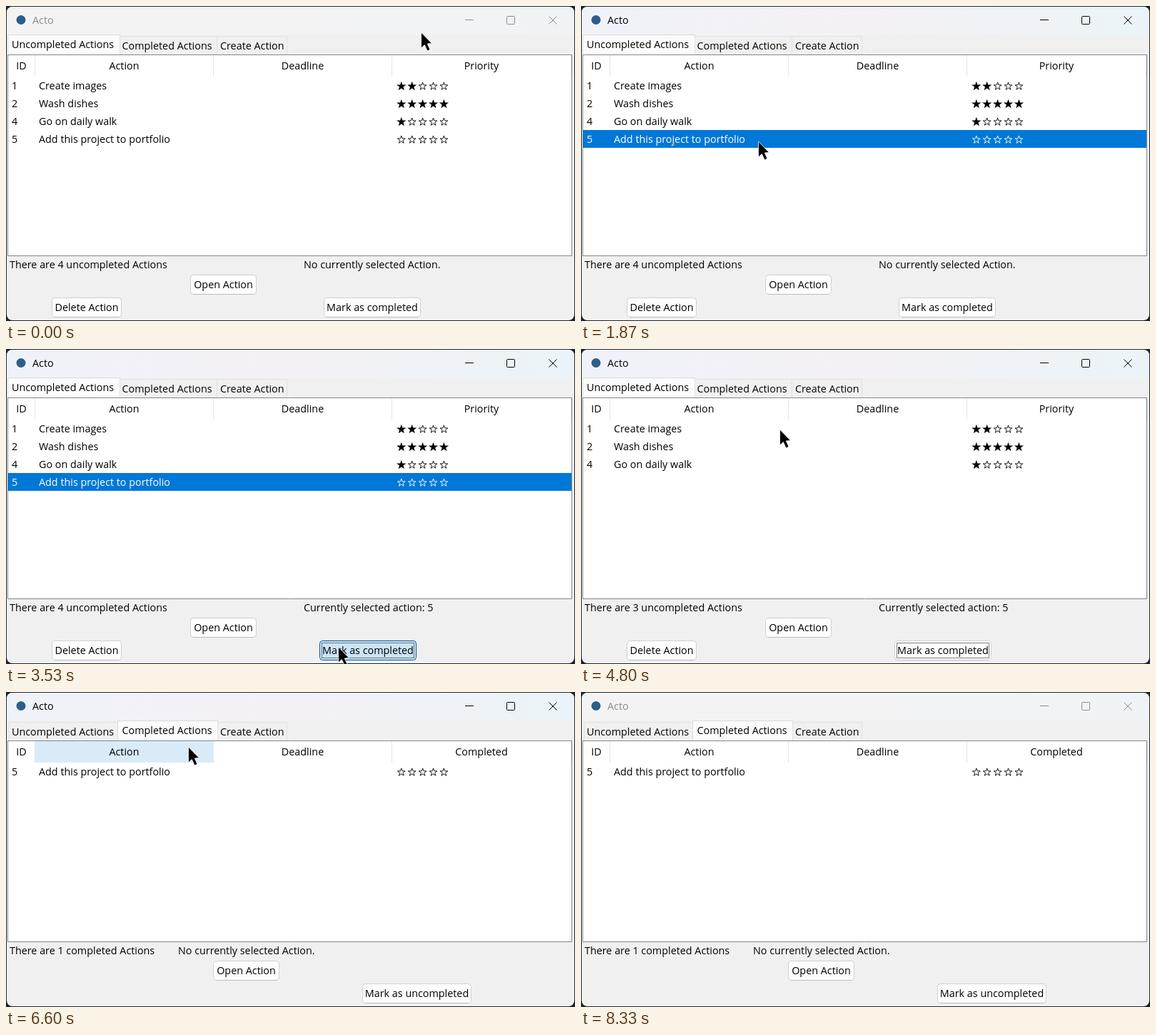
Animation, 797 px wide and 442 px high, one loop 8470 ms. Source, as an HTML page with a canvas:

```html
<!DOCTYPE html>
<html lang="en">
<head>
<meta charset="utf-8">
<title>Acto</title>
<style>
html, body { margin: 0; width: 100%; height: 100%; overflow: hidden; background: #1c2331; }
canvas { display: block; }
</style>
</head>
<body>
<canvas id="stage" width="797" height="442"></canvas>
<script>
const ctx = document.getElementById('stage').getContext('2d');
const LOOP = 8470, TICK = 200 / 3;
const BLACK = '#000', WHITE = '#fff', FACE = '#f0f0f0', LINE = '#dadada';

// Moments when the interface changes, in ms
const SELECT = 1866, STATUS = 1930, PRESS = 3465, REMOVE = 3665, SWITCH = 5530, BLUR = 8265;

// Pointer path: time, x, y
const PATH = [
  [0, 581, 36], [267, 449, 253], [533, 449, 253], [867, 309, 226],
  [1067, 309, 226], [1733, 248, 189], [2200, 248, 189], [3067, 465, 404],
  [3400, 465, 417], [3867, 465, 417], [4733, 281, 133], [4800, 278, 112],
  [5400, 248, 54], [5800, 248, 54], [6600, 255, 76], [6667, 256, 81],
  [7533, 99, 400], [7800, 82, 448], [LOOP, 82, 448]
];
const COLUMNS = [[3, 40], [40, 291], [290, 541], [540, 792]];
const ACTIONS = [
  ['1', 'Create images', 2], ['2', 'Wash dishes', 5],
  ['4', 'Go on daily walk', 1], ['5', 'Add this project to portfolio', 0]
];

const slope = (i, axis) =>
  (PATH[i + 1][axis] - PATH[i][axis]) / (PATH[i + 1][0] - PATH[i][0]);

// Zero at rests and turning points, so the path never overshoots
function tangent(i, axis) {
  if (i === 0) return slope(0, axis);
  if (i === PATH.length - 1) return 0;
  const a = slope(i - 1, axis), b = slope(i, axis);
  return a * b > 0 ? 2 * a * b / (a + b) : 0;
}

function pointerAt(t) {
  let i = 0;
  while (i < PATH.length - 2 && t >= PATH[i + 1][0]) i++;
  const span = PATH[i + 1][0] - PATH[i][0], u = (t - PATH[i][0]) / span;
  const u2 = u * u, u3 = u2 * u;
  const at = axis => Math.round(
    (2 * u3 - 3 * u2 + 1) * PATH[i][axis] + (3 * u2 - 2 * u3) * PATH[i + 1][axis] +
    span * ((u3 - 2 * u2 + u) * tangent(i, axis) + (u3 - u2) * tangent(i + 1, axis)));
  return { x: at(1), y: at(2) };
}

function rect(x, y, w, h, color) {
  ctx.fillStyle = color;
  ctx.fillRect(x, y, w, h);
}

function box(x, y, w, h, radius, fill, stroke) {
  ctx.beginPath();
  ctx.roundRect(x + 0.5, y + 0.5, w - 1, h - 1, radius);
  if (fill) { ctx.fillStyle = fill; ctx.fill(); }
  if (stroke) { ctx.strokeStyle = stroke; ctx.lineWidth = 1; ctx.stroke(); }
}

function text(str, x, y, color = BLACK, align = 'left') {
  ctx.fillStyle = color;
  ctx.textAlign = align;
  ctx.fillText(str, x, y);
}

function polygon(points) {
  ctx.beginPath();
  points.forEach(([x, y]) => ctx.lineTo(x, y));
  ctx.closePath();
}

function star(cx, cy, filled, color) {
  const radius = filled ? 7 : 5.7;
  polygon(Array.from({ length: 10 }, (_, i) => {
    const r = i % 2 ? radius * 0.4 : radius, a = (i / 5 - 0.5) * Math.PI;
    return [cx + r * Math.cos(a), cy + r * Math.sin(a)];
  }));
  ctx.fillStyle = ctx.strokeStyle = color;
  ctx.lineWidth = 0.9;
  if (filled) ctx.fill(); else ctx.stroke();
}

function titleBar(active) {
  const shade = ctx.createLinearGradient(0, 0, 797, 0);
  const stops = active ? ['#f0f2f9', '#f4f1f6', '#eaf4f8'] : ['#f3f3f3', '#f3f3f4', '#f0f3f5'];
  stops.forEach((c, i) => shade.addColorStop(i / 2, c));
  rect(1, 1, 795, 39, shade);
  ctx.beginPath();
  ctx.arc(21, 19.5, 6.5, 0, 2 * Math.PI);
  ctx.fillStyle = '#2b5f8a';
  ctx.fill();
  const ink = active ? BLACK : '#8c8c8c';
  text('Acto', 37, 25, ink);
  rect(643, 19, 12, 1, ink);
  box(701, 14, 12, 12, 1, null, ink);
  ctx.beginPath();
  ctx.moveTo(760.5, 14.5); ctx.lineTo(771.5, 25.5);
  ctx.moveTo(771.5, 14.5); ctx.lineTo(760.5, 25.5);
  ctx.stroke();
}

function tabs(done) {
  const edges = done ? [4, 156, 296, 394] : [2, 159, 295, 394];
  [['Uncompleted Actions', 8], ['Completed Actions', 162.5], ['Create Action', 300]]
    .forEach(([label, x], i) => {
      const on = i === (done ? 1 : 0), top = on ? 40 : 42;
      box(edges[i], top, edges[i + 1] - edges[i] + (i < 2 ? 1 : 0), 70 - top, 0, on ? '#fbfbfb' : FACE, on ? LINE : '#e2e2e2');
      text(label, x, on ? 59 : 61);
    });
}

function table(done, rows, selected, pointer) {
  box(2, 68, 791, 283, 0, WHITE, '#828790');
  ['ID', 'Action', 'Deadline', done ? 'Completed' : 'Priority'].forEach((label, i) => {
    const [left, right] = COLUMNS[i];
    const hot = pointer.y >= 69 && pointer.y < 99 && pointer.x >= left && pointer.x < right;
    if (hot) rect(left, 69, right - left, 30, '#d9ebf9');
    else rect(right - (i ? 1 : 0), 69, 1, 30, '#e5e5e5');
    text(label, (left + right) / 2, 89, BLACK, 'center');
  });
  rows.forEach(([id, name, rank], i) => {
    const y = 99 + 25 * i, on = id === selected, ink = on ? WHITE : BLACK;
    if (on) rect(3, y, 789, 25, '#0078d7');
    text(id, 8, y + 18, ink);
    text(name, 46, y + 18, ink);
    for (let s = 0; s < 5; s++) star(553.8 + 14.9 * s, y + 13.7, s < rank, ink);
  });
}

function button(label, x, y, w, pointer, focus, pressed) {
  const h = 28;
  const hot = pointer.x >= x && pointer.x < x + w && pointer.y >= y && pointer.y < y + h;
  const fill = pressed ? '#cce4f7' : hot ? '#e0eef9' : '#fdfdfd';
  const edge = pressed ? '#005499' : hot ? '#0078d4' : '#d0d0d0';
  box(x, y, w, h, 4, fill, edge);
  if (!hot && !pressed) rect(x + 4, y + h - 1, w - 8, 1, '#bcbcbc');
  if (focus) {
    ctx.setLineDash([1, 1]);
    box(x + 3, y + 3, w - 6, h - 6, 0, null, BLACK);
    ctx.setLineDash([]);
  }
  text(label, x + w / 2, y + 19, BLACK, 'center');
}

function drawPointer({ x, y }) {
  polygon([[0.5, 1], [0.5, 23], [5.3, 18.6], [9.2, 27], [13, 25.3], [9.3, 17], [15.5, 16.5]]
    .map(([dx, dy]) => [x + dx, y + dy]));
  ctx.fillStyle = BLACK;
  ctx.fill();
  ctx.strokeStyle = WHITE;
  ctx.lineWidth = 0.8;
  ctx.stroke();
}

function draw(t) {
  const pointer = pointerAt(t);
  const done = t >= SWITCH, picked = t >= STATUS;
  ctx.font = '14.35px "Open Sans", "Noto Sans", sans-serif';
  rect(0, 0, 797, 442, '#1c2331');
  ctx.save();
  ctx.beginPath();
  ctx.roundRect(1, 1, 795, 440, 8);
  ctx.clip();
  rect(1, 1, 795, 440, FACE);
  titleBar(t >= SELECT && t < BLUR);
  tabs(done);
  if (done) {
    table(true, ACTIONS.slice(3), null, pointer);
    text('There are 1 completed Actions', 5, 368);
    text('No currently selected Action.', 241, 368);
    button('Open Action', 290, 377, 93, pointer);
    button('Mark as uncompleted', 499, 409, 153, pointer);
  } else {
    const rows = ACTIONS.slice(0, t < REMOVE ? 4 : 3);
    table(false, rows, t >= SELECT ? '5' : null, pointer);
    text(`There are ${rows.length} uncompleted Actions`, 5, 368);
    text(picked ? 'Currently selected action: 5' : 'No currently selected Action.', 417, 368);
    button('Open Action', 258, 377, 93, pointer);
    button('Delete Action', 64, 409, 98, pointer);
    button('Mark as completed', picked ? 439 : 445, 409, 136, pointer,
      t >= PRESS, t >= PRESS && t < REMOVE);
  }
  ctx.restore();
  drawPointer(pointer);
}

function frame() {
  const t = performance.now() % LOOP;
  draw(Math.floor((t + 4) / TICK) * TICK);
  requestAnimationFrame(frame);
}
frame();
</script>
</body>
</html>
```
